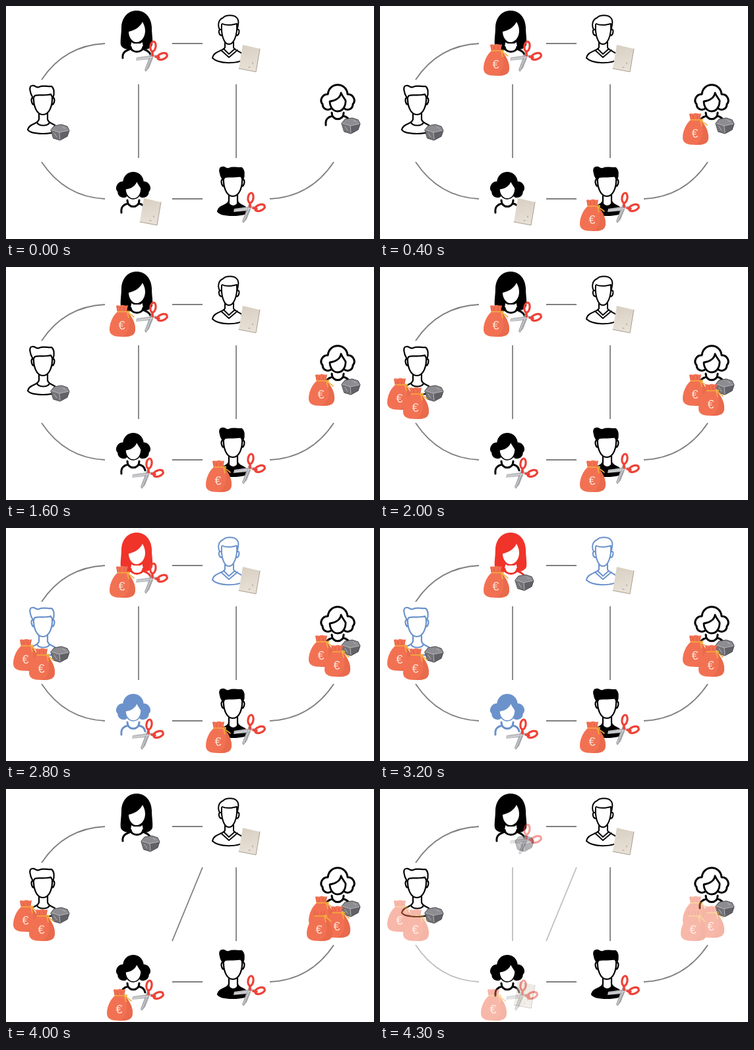
These frames come from a looping animation (558 by 354 pixels, 4400 ms). An HTML page with a canvas:

```html
<!DOCTYPE html>
<html lang="en">
<head>
<meta charset="utf-8">
<title>Rock, paper, scissors network</title>
<style>
html, body { margin: 0; width: 100%; height: 100%; overflow: hidden; background: #fff; }
canvas { display: block; }
</style>
</head>
<body>
<canvas id="stage" width="558" height="354"></canvas>
<script>
const W = 558, H = 354, STEPS = 11, STEP_MS = 400, HOLD_MS = 300;
const ctx = document.getElementById('stage').getContext('2d');
const layer = document.createElement('canvas');
layer.width = W;
layer.height = H;
const g = layer.getContext('2d');

const INK = { k: '#000', r: '#f0342a', b: '#6b92cb' };

const paths = new Map();
function path(d) {
  if (!paths.has(d)) paths.set(d, new Path2D(d));
  return paths.get(d);
}
function fill(d, color) {
  g.fillStyle = color;
  g.fill(path(d));
}
function stroke(d, color, width) {
  g.strokeStyle = color;
  g.lineWidth = width;
  g.stroke(path(d));
}
function at(x, y, draw) {
  g.save();
  g.translate(x, y);
  draw();
  g.restore();
}

// People
function longHair(c) {
  fill('M198 7C185 7 176 17 175 32C175 43 173 52 174 59C176 64 182 67 188 65L190 57H207L209 65C214 67 220 64 222 59C223 52 221 43 221 32C220 17 211 7 198 7Z', c);
  fill('M186 39C196 37 204 31 207 24C209 28 211 32 211 38C211 47 205 55 198 55C191 55 186 47 186 39Z', '#fff');
  fill('M190 55C195 59 202 59 207 55V64C202 69 195 69 190 64Z', '#fff');
  stroke('M177 79C176 71 181 68 189 65M189 62C189 72 208 72 208 62M208 65C215 68 220 71 220 78', c, 3);
}

const CURLS = 'M488 134C490 115 516 115 518 134C527 134 531 144 526 149C526 157 517 160 512 155C507 161 499 161 494 155C489 160 480 157 480 149C475 144 479 134 488 134Z';
const CURLY_FACE = 'M491 145C500 144 507 139 508 132C510 137 513 140 515 144C515 153 510 160 503 160C496 160 491 153 491 145Z';
function curlyHair(c, solid) {
  if (solid) fill(CURLS, c);
  stroke(CURLS, c, solid ? 1.5 : 3);
  fill(CURLY_FACE, '#fff');
  stroke(CURLY_FACE, c, solid ? 1.5 : 2.8);
  stroke('M485 181C484 172 488 169 495 167M494 162C494 175 512 175 512 162M511 167C517 168 520 171 521 176', c, 3);
}

const TORSO = 'M50 163V172C49 180 35 178 33 188C38 196 74 196 79 188C77 178 64 180 63 172V163';
const FACE = 'M42 136C41 151 46 165 56 165C66 165 71 151 70 136';
const EARS = 'M41 140C37 138 38 150 43 150M71 140C75 138 74 150 69 150';
const QUIFF = 'M41 140C36 132 34 121 40 121C44 120 46 125 50 123C57 120 64 123 69 122C73 125 74 133 71 140L68 134C59 137 49 134 44 136Z';
function man(c, solid) {
  if (solid) {
    fill(TORSO, c);
    fill('M51 162V176C54 180 59 180 62 176V162Z', '#fff');
  }
  stroke(TORSO + 'M47 177C50 183 63 183 66 177', c, 2.2);
  fill(FACE, '#fff');
  stroke(FACE + EARS, c, 2.2);
  fill(QUIFF, solid ? c : '#fff');
  stroke(QUIFF, c, 2.2);
}
function vNeckMan(c) {
  stroke('M332 55V63C329 69 315 68 313 79C322 88 350 89 363 80C361 69 347 69 345 63V55', c, 2);
  stroke('M330 65L338 73L347 65M326 67L338 78L351 67', c, 1.8);
  fill('M327 28C325 43 330 58 338 58C346 58 351 43 350 28Z', '#fff');
  stroke('M327 28C326 43 330 58 338 58C346 58 351 43 350 28M326 36C321 34 322 45 328 45M351 36C355 34 354 45 349 45', c, 2);
  stroke('M324 36C320 28 323 20 329 18C333 13 346 13 350 18C354 22 352 28 351 34M328 27C335 31 344 28 350 27', c, 2);
}

// Objects
const STONE = 'M0 8L5 2L16 0L25 3L28 9L25 18L14 24L4 21Z';
function stone() {
  fill(STONE, '#737277');
  fill('M0 8L5 2L16 0L25 3L28 9L13 12Z', '#8d8c91');
  fill('M13 12L28 9L25 18L14 24Z', '#626167');
  stroke('M1 8L13 12L27 9M13 12L14 23M5 13L9 19M18 4L22 6', '#b5b4b8', 1);
  stroke(STONE, '#4c4b50', 1);
}
function paper() {
  const shade = g.createLinearGradient(10, 0, 18, 42);
  shade.addColorStop(0, '#d8cfc2');
  shade.addColorStop(1, '#e9e2d8');
  fill('M6 1L32 7L26 42L0 37Z', shade);
  stroke('M32 7L26 42L0 37', '#a99d8e', 1);
  stroke('M21 28V30M15 35H17', '#8e8375', 0.8);
}
function scissors() {
  fill('M34 23L22 24L1 27L0 32L22 30Z', '#bbbcbf');
  fill('M23 20L13 46L15 49L20 43L28 23Z', '#a5a6aa');
  stroke('M30 26L2 30M24 25L15 46', '#dcdddf', 1);
  stroke('M25 24L25 18M30 26L35 27', '#ee4237', 3.6);
  stroke('M22 10A4 7.5 8 1 1 30 11A4 7.5 8 1 1 22 10Z', '#ee4237', 3.2);
  stroke('M33 28A7.5 4 -20 1 1 47 23A7.5 4 -20 1 1 33 28Z', '#ee4237', 3.2);
}
function bag() {
  fill('M12 11L10 2C13 0 15 3 18 1C22 0 24 3 28 1L26 11C33 16 39 27 39 37C39 46 34 49 20 49C6 49 0 46 0 38C0 27 6 16 12 11Z', '#f27153');
  fill('M27 12C33 17 39 27 39 37C39 46 34 49 20 49C30 43 34 29 27 12Z', '#e96a4c');
  stroke('M12 10L11 3M16 9V4M22 9V4M26 10L27 3', '#d9573b', 0.8);
  stroke('M12 11H26C31 8 32 13 27 12C32 14 34 17 37 19M27 12L29 20', '#f4ae3d', 1.6);
  g.fillStyle = '#fbe3d4';
  g.font = '18px "Liberation Sans", Arial, sans-serif';
  g.textAlign = 'center';
  g.fillText('€', 18.5, 38);
}

// Colour of each person per step
const people = [
  { tint: 'kkkbkkrrrkk', x: 0, y: 0, draw: longHair },
  { tint: 'kkkkkkkbbkk', x: 0, y: 0, draw: vNeckMan },
  { tint: 'kkkbkkkbbkk', x: 0, y: 0, draw: man },
  { tint: 'kkkkkkkkkkk', x: 0, y: 0, draw: curlyHair },
  { tint: 'kkrrkkkbbkk', x: -310, y: 133, draw: curlyHair, solid: true },
  { tint: 'kkkbkkkkkkk', x: 288, y: 124, draw: man, solid: true }
];

// [draw, x, y, first step, last step]
const items = [
  [stone, 68, 180, 0, 10], [stone, 509, 170, 0, 10], [stone, 205, 71, 8, 10],
  [paper, 353, 58, 0, 10], [paper, 203, 291, 0, 3],
  [scissors, 197, 51, 0, 7], [scissors, 345, 281, 0, 10], [scissors, 191, 288, 4, 10],
  [bag, 157, 57, 1, 9], [bag, 459, 162, 1, 10], [bag, 303, 293, 1, 9],
  [bag, 11, 168, 5, 10], [bag, 35, 182, 5, 10], [bag, 483, 177, 5, 10],
  [bag, 456, 182, 10, 10], [bag, 153, 303, 10, 10]
];

const fixedLinks = 'M54 112C76 79 107 59 150 57M252 57H298M252 293H298M400 293C443 291 475 270 497 237';
const firstLinks = 'M54 237C76 270 107 291 150 293M201 119V231';
const rightLink = 'M349 119V231';
const newLink = 'M298 119L252 231';

function scene(step) {
  g.fillStyle = '#fff';
  g.fillRect(0, 0, W, H);
  g.lineCap = 'butt';
  const links = fixedLinks + (step < 9 ? firstLinks : newLink) + (step !== 9 ? rightLink : '');
  stroke(links, '#7f7f7f', 1.8);
  g.lineCap = g.lineJoin = 'round';
  for (const p of people) at(p.x, p.y, () => p.draw(INK[p.tint[step]], p.solid));
  for (const [draw, x, y, first, last] of items) {
    if (step >= first && step <= last) at(x, y, draw);
  }
}

function show(step, alpha) {
  scene(step);
  ctx.globalAlpha = alpha;
  ctx.drawImage(layer, 0, 0);
}

function frame() {
  const t = performance.now() % (STEPS * STEP_MS);
  const step = Math.floor(t / STEP_MS);
  show(step, 1);
  if (t % STEP_MS >= HOLD_MS) show((step + 1) % STEPS, 0.5);
  requestAnimationFrame(frame);
}
frame();
</script>
</body>
</html>
```
